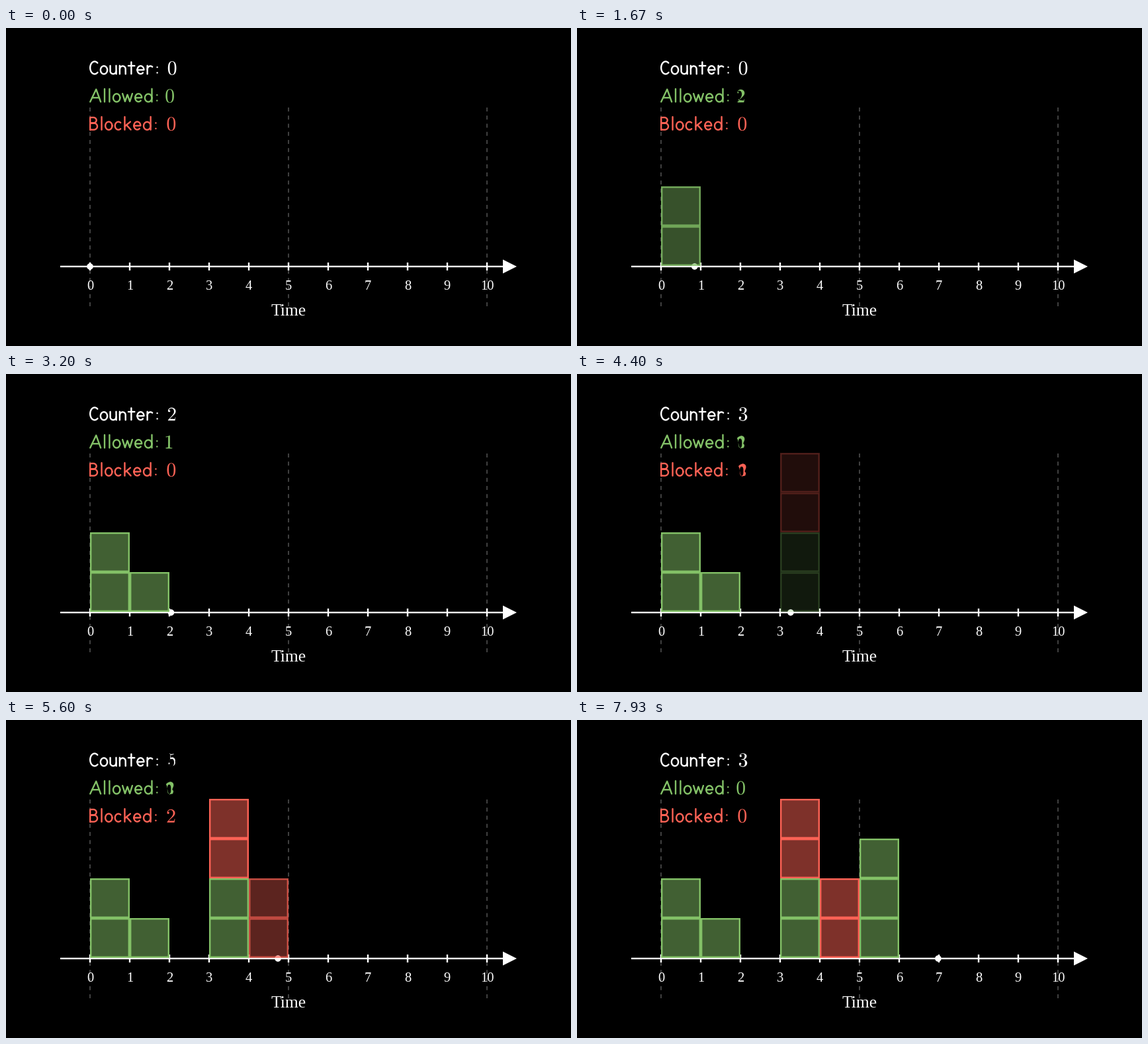
A matplotlib script that plays this animation: 854 px wide and 480 px high, repeating every 8 s.

```python
import numpy as np
import matplotlib.pyplot as plt
from matplotlib.animation import FuncAnimation
from matplotlib.patches import Circle, PathPatch, Polygon, Rectangle
from matplotlib.path import Path
from matplotlib.textpath import TextPath

plt.rcParams["mathtext.fontset"] = "cm"
plt.rcParams["path.snap"] = False

W, H, DPI = 854, 480, 64          # a power of two keeps the size exact
PX = 72 / DPI                     # one pixel in points
UNIT, X0, Y0 = 60, 127, 360       # grid unit and axis origin
FRAMES, DURATION, STEP = 120, 8000, 15
WHITE, GREEN, RED, GRAY = "#ffffff", "#83c167", "#fc6255", "#404040"

fig = plt.figure(figsize=(W / DPI, H / DPI), dpi=DPI, facecolor="black")
ax = fig.add_axes([0, 0, 1, 1])
ax.set_xlim(0, W)
ax.set_ylim(H, 0)
ax.axis("off")


def line(x, y, color=WHITE, width=2.4, cap="butt", z=1):
    ax.plot(x, y, color=color, lw=width * PX, solid_capstyle=cap,
            solid_joinstyle="round", zorder=z)


# ---- handwritten labels: pen strokes in 1/1000 em, y up ----

def poly(*xy):
    return np.array(xy, float).reshape(-1, 2)


def arc(cx, cy, rx, ry, start, end):
    a = np.radians(np.linspace(start, end, 40))
    return np.column_stack([cx + rx * np.cos(a), cy + ry * np.sin(a)])


def join(*parts):
    return np.vstack(parts)


GLYPHS = {
    "C": (603, [arc(345, 370, 250, 350, 50, 312)]),
    "o": (527, [arc(262, 245, 190, 225, 0, 360)]),
    "u": (520, [join(poly(90, 485), arc(255, 190, 165, 165, 180, 360)),
                poly(420, 490, 428, 20)]),
    "n": (523, [poly(100, 490, 100, 20),
                join(arc(265, 300, 160, 165, 180, 0), poly(428, 20))]),
    "t": (471, [poly(225, 690, 225, 25), poly(60, 480, 410, 480)]),
    "e": (548, [join(poly(92, 245), arc(275, 250, 185, 222, 0, 315))]),
    "r": (480, [poly(105, 490, 105, 20), arc(275, 270, 170, 195, 180, 50)]),
    ":": (359, [poly(175, 400, 183, 400), poly(175, 90, 183, 90)]),
    "A": (731, [poly(60, 20, 395, 720, 650, 20), poly(165, 250, 570, 250)]),
    "l": (274, [poly(137, 745, 137, 20)]),
    "w": (683, [poly(65, 480, 205, 40, 340, 420, 475, 40, 615, 480)]),
    "d": (588, [arc(280, 240, 195, 220, 0, 360), poly(478, 750, 478, 20)]),
    "B": (630, [join(poly(125, 25, 125, 710), arc(300, 555, 175, 155, 90, -90),
                     poly(125, 400), arc(320, 212, 205, 188, 90, -90),
                     poly(125, 25))]),
    "c": (514, [arc(275, 245, 190, 222, 50, 310)]),
    "k": (540, [poly(115, 745, 115, 20), poly(430, 470, 120, 215),
                poly(215, 290, 455, 25)]),
}


def label(text, left, baseline, color, em=27):
    pen, strokes = 0, []
    for ch in text:
        advance, parts = GLYPHS[ch]
        strokes += [p + (pen, 0) for p in parts]
        pen += advance
    first = min(s[:, 0].min() for s in strokes)
    for s in strokes:
        line(left + 1.2 + (s[:, 0] - first) * em / 1000,
             baseline - s[:, 1] * em / 1000, color, 2.4, "round", 6)


# ---- digits that morph outline to outline ----

SAMPLES = 360
STARTS = {0: [(.458, .319), (.249, 0)], 1: [(.294, .638)],
          2: [(.126, .076)], 3: [(.289, .351)], 5: [(.447, .2)]}


def segments(path):
    """Split a path into contours of quadratic segments."""
    out, i = [], 0
    v, codes = path.vertices, path.codes
    while i < len(codes):
        code = codes[i]
        if code == Path.MOVETO:
            out.append([])
            start = pen = v[i]
        elif code == Path.CURVE3:
            out[-1].append((pen, v[i], v[i + 1]))
            pen = v[i + 1]
            i += 1
        else:
            end = start if code == Path.CLOSEPOLY else v[i]
            if np.hypot(*(end - pen)) > 1e-6:
                out[-1].append((pen, (pen + end) / 2, end))
            pen = end
        i += 1
    return [c for c in out if c]


def area(contour):
    x, y = np.array([s[0] for s in contour]).T
    return np.sum(x * np.roll(y, -1) - y * np.roll(x, -1))


def sample(contour, start, ccw):
    if (area(contour) > 0) != ccw:
        contour = [s[::-1] for s in reversed(contour)]
    k = int(np.argmin([np.hypot(*(s[0] - start)) for s in contour]))
    contour = np.array(contour[k:] + contour[:k])
    u = np.arange(SAMPLES) * len(contour) / SAMPLES
    i = u.astype(int)
    t = (u - i)[:, None]
    a, b, c = contour[i].transpose(1, 0, 2)
    return (1 - t) ** 2 * a + 2 * t * (1 - t) * b + t ** 2 * c


def digit(d, em=30):
    """Outer and inner contour, left edge at 0, centred on y = 0."""
    parts = segments(TextPath((0, 0), f"${d}$", size=1))
    parts.sort(key=lambda c: -abs(area(c)))
    rings = [sample(c, np.array(s), n == 0)
             for n, (c, s) in enumerate(zip(parts, STARTS[d]))]
    if len(rings) == 1:
        rings.append(np.repeat(rings[0][:1], SAMPLES, axis=0))
    lo, hi = rings[0].min(0), rings[0].max(0)
    return (np.array(rings) - (lo[0], (lo[1] + hi[1]) / 2)) * (em, -em)


DIGITS = {d: digit(d) for d in STARTS}
RING_CODES = [Path.MOVETO] + [Path.LINETO] * (SAMPLES - 1) + [Path.CLOSEPOLY]


class Counter:
    def __init__(self, text, values, x, y, color):
        label(text, 126, y + 9.5, color)
        self.values, self.pos = values, (x, y)
        self.patch = ax.add_patch(PathPatch(Path([(0, 0)]), fc=color, lw=0,
                                            zorder=6))

    def show(self, step, t):
        a, b = (DIGITS[self.values[k]] for k in (step, step + 1))
        rings = a + (b - a) * t + self.pos
        verts = np.vstack([np.vstack([r, r[:1]]) for r in rings])
        self.patch.set_path(Path(verts, RING_CODES * 2))


# ---- static scene ----

for n in (0, 5, 10):
    for k in range(25):
        top = 120 + k * 12.25
        line([X0 + n * UNIT] * 2, [top, top + 6], GRAY, 2)

line([82, 752], [Y0, Y0], z=2)
ax.add_patch(Polygon([(751, 349.5), (772, Y0), (751, 370.5)], fc=WHITE, lw=0,
                     zorder=2))
for n in range(11):
    x = X0 + n * UNIT
    line([x, x], [Y0 - 6, Y0 + 6], z=2)
    ax.text(x, 395, str(n), color=WHITE, family="Liberation Serif",
            size=20.5 * PX, ha="center", va="baseline", zorder=5)
ax.text(427, 434, "Time", color=WHITE, family="Liberation Serif",
        size=25.6 * PX, ha="center", va="baseline", zorder=5)

# ---- moving parts ----

counters = [
    Counter("Counter:", [0, 0, 2, 3, 3, 5, 0, 3], 244.8, 60.5, WHITE),
    Counter("Allowed:", [0, 2, 1, 0, 2, 0, 3, 0], 241.3, 102.5, GREEN),
    Counter("Blocked:", [0, 0, 0, 0, 2, 2, 0, 0], 243.5, 144.7, RED),
]

dot = ax.add_patch(Circle((X0, Y0), 4.8, fc=WHITE, lw=0, zorder=3))

STACKS = {0: "gg", 1: "g", 3: "ggrr", 4: "rr", 5: "ggg"}
SIDE = 57.6
boxes = []
for col, stack in STACKS.items():
    for row, kind in enumerate(stack):
        corner = (X0 + col * UNIT + 1.2, Y0 - 1 - (row + 1) * UNIT + 1.2)
        box = ax.add_patch(Rectangle(corner, SIDE, SIDE, lw=2.4 * PX, zorder=4))
        boxes.append((col, GREEN if kind == "g" else RED, box))


def smooth(t):
    def sig(x):
        return 1 / (1 + np.exp(-x))
    edge = sig(-5)
    return float(np.clip((sig(10 * (t - .5)) - edge) / (1 - 2 * edge), 0, 1))


def draw(frame):
    step = frame // STEP - 1
    t = smooth(frame % STEP / STEP) if step >= 0 else 0.0
    step = max(step, 0)
    dot.center = (X0 + (step + t) * UNIT, Y0)
    for col, color, box in boxes:
        a = float(np.clip(step + t - col, 0, 1))
        box.set_facecolor((color, a / 2))
        box.set_edgecolor((color, a))
    for c in counters:
        c.show(step, t)
    return [dot, *(b for _, _, b in boxes), *(c.patch for c in counters)]


anim = FuncAnimation(fig, draw, frames=FRAMES, interval=DURATION / FRAMES,
                     repeat=True, repeat_delay=0, blit=False)
plt.show()
```
